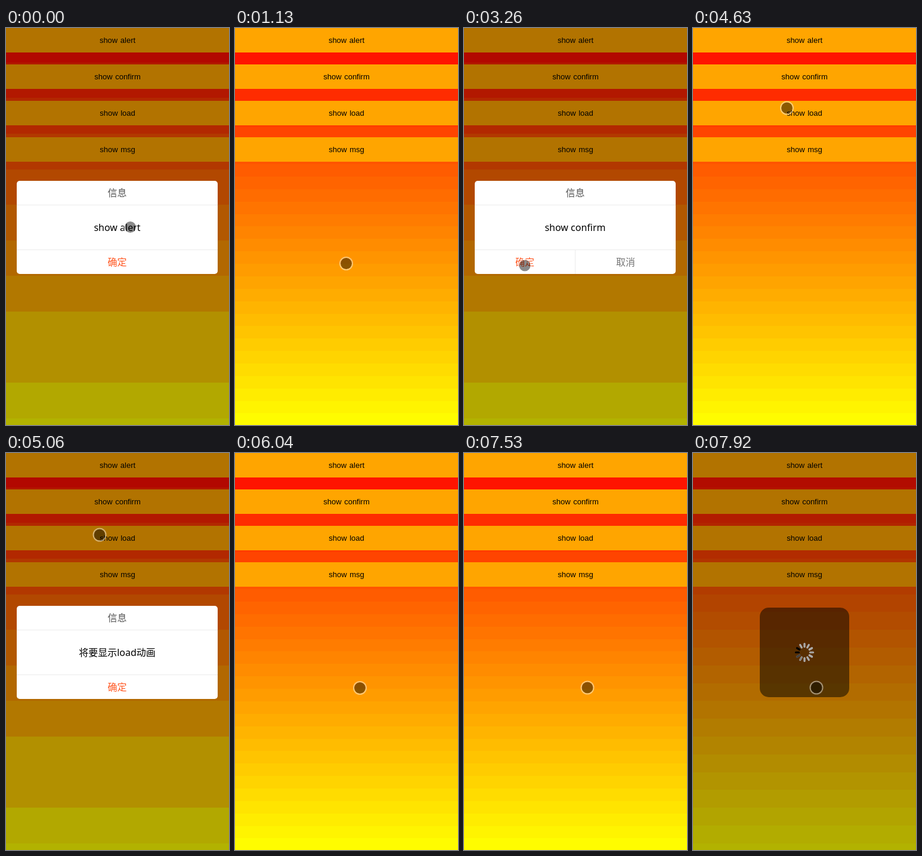
An HTML page with a canvas for the animation above (8 s loop, 374 by 665 pixels).

```html
<!DOCTYPE html>
<html lang="zh-CN">
<head>
<meta charset="utf-8">
<title>Dialogs</title>
<style>
html, body { margin: 0; width: 100%; height: 100%; overflow: hidden; }
#stage { position: relative; width: 374px; height: 665px; overflow: hidden; }
#stage > * { position: absolute; }
#sky { left: 0; top: 0; }
#menu { inset: 0; }
#menu div {
  height: 41px; margin-bottom: 20px; background: #ffa500; color: #000; text-align: center;
  font: 13px/41px Arial, "Liberation Sans", sans-serif; word-spacing: 1px;
}
#shade { inset: 0; background: #000; }
#dialog {
  left: 18px; top: 256px; width: 337px; height: 156px; border-radius: 5px;
  background: #fff; overflow: hidden; text-align: center;
  font: 16px/40px "Noto Sans", "Noto Sans CJK SC", "Noto Sans CJK", sans-serif;
}
#title { height: 40px; color: #555; border-bottom: 1px solid #ebebeb; }
#msg { height: 74px; line-height: 74px; color: #000; white-space: pre; }
#foot { display: flex; height: 40px; border-top: 1px solid #ebebeb; }
#foot span { flex: 1; }
#yes { color: #ff5722; }
#no { color: #777; border-left: 1px solid #ebebeb; }
#loader {
  left: 112px; top: 259px; width: 150px; height: 150px; border-radius: 15px;
  background: rgba(0, 0, 0, .5);
}
#cursor {
  left: -11.5px; top: -11.5px; width: 19px; height: 19px; border-radius: 50%;
  border: 2px solid rgba(255, 255, 255, .45);
  background: rgba(0, 0, 0, .46); background-clip: padding-box;
}
</style>
</head>
<body>
<div id="stage">
  <canvas id="sky" width="374" height="665"></canvas>
  <div id="menu">
    <div>show alert</div>
    <div>show confirm</div>
    <div>show load</div>
    <div>show msg</div>
  </div>
  <div id="shade"></div>
  <div id="dialog">
    <div id="title">信息</div>
    <div id="msg"></div>
    <div id="foot"><span id="yes">确定</span><span id="no">取消</span></div>
  </div>
  <div id="loader"><svg width="150" height="150" viewBox="-75 -75 150 150"></svg></div>
  <div id="cursor"></div>
</div>
<script>
const LOOP = 8000, OPEN = 300, DIM = 0.3, H = 665;
const $ = id => document.getElementById(id);
const clamp = (v, lo, hi) => Math.min(hi, Math.max(lo, v));

const LAYERS = [
  { from: -OPEN, to: 1130, msg: 'show alert' },
  { from: 2103, to: 3810, msg: 'show confirm', no: true },
  { from: 4760, to: 6040, msg: '将要显示load动画' },
  { from: 6155, to: 7530, msg: 'load 动画将在3秒后关闭！' },
  { from: 7620, to: LOOP }
];

// The pointer rests at each stop until the next move begins
const HOME = { x: 208, y: 333 };
const MOVES = [
  { from: 0, to: 390, x: 186, y: 394 },
  { from: 1270, to: 1980, x: 168, y: 81.5 },
  { from: 2540, to: 3260, x: 101.5, y: 397.5 },
  { from: 3810, to: 4630, x: 157, y: 133.5 },
  { from: 4770, to: 4910, x: 156.5, y: 136.5 },
  { from: 5060, to: 5920, x: 209, y: 393 },
  { from: 6710, to: 6850, x: 206.5, y: 392.5 }
];

function pointer(t) {
  let { x, y } = HOME;
  for (const m of MOVES) {
    const u = clamp((t - m.from) / (m.to - m.from), 0, 1);
    const k = u * u * (3 - 2 * u);
    x += (m.x - x) * k;
    y += (m.y - y) * k;
  }
  return [x, y];
}

// CSS "ease" curve, solved by bisection
const bezier = (a, b, s) => 3 * a * s * (1 - s) ** 2 + 3 * b * s * s * (1 - s) + s ** 3;
function ease(x) {
  if (x >= 1) return 1;
  let lo = 0, hi = 1;
  for (let i = 0; i < 20; i++) {
    const mid = (lo + hi) / 2;
    if (bezier(.25, .25, mid) < x) lo = mid; else hi = mid;
  }
  return bezier(.1, 1, lo);
}

// Red to yellow in flat bands; dimming makes them taller, a dialog makes them coarser
const ctx = $('sky').getContext('2d');
let painted = '';
function drawSky(light, coarse) {
  const key = light + '/' + coarse;
  if (key === painted) return;
  painted = key;
  const step = coarse ? 16 : 8;
  for (let y = 0; y < H; y++) {
    const band = Math.floor(((y + .5) / H * 255 * light + .5) / step);
    const level = coarse && band >> 1 === 4 ? 9 : band + .5;
    ctx.fillStyle = `rgb(255,${Math.min(255, Math.round(level * step / light))},0)`;
    ctx.fillRect(0, y, 374, 1);
  }
}

const svg = document.querySelector('svg');
function addSpoke(angle, width) {
  const line = document.createElementNS('http://www.w3.org/2000/svg', 'line');
  const attrs = { y1: -9.5, y2: -14.5, 'stroke-width': width,
    'stroke-linecap': 'round', transform: `rotate(${angle})` };
  for (const name in attrs) line.setAttribute(name, attrs[name]);
  svg.append(line);
  return line;
}
const spokes = Array.from({ length: 12 }, (_, i) =>
  ({ rim: addSpoke(i * 30, 3.2), core: addSpoke(i * 30, 1.8) }));

// The darkest spoke runs clockwise, the ones behind it fade to grey
function spin(t) {
  const head = Math.floor(t / 80) + 7;
  const gray = v => `rgb(${v},${v},${v})`;
  spokes.forEach(({ rim, core }, i) => {
    const age = (head - i + 144) % 12;
    core.setAttribute('stroke', gray(clamp((age - 1) * 60, 0, 165)));
    rim.setAttribute('stroke', gray(clamp((age - 1) * 90, 0, 187)));
  });
}

function render(t) {
  const layer = LAYERS.find(l => t >= l.from && t < l.to);
  const p = layer ? ease((t - layer.from) / OPEN) : 0;
  const isDialog = Boolean(layer && layer.msg);
  drawSky(1 - DIM * p, isDialog && p > .5);
  $('shade').style.opacity = DIM * p;

  const look = { opacity: p, transform: p < 1 ? `scale(${1.1 - .1 * p})` : 'none' };
  $('dialog').style.display = isDialog ? 'block' : 'none';
  $('loader').style.display = layer && !isDialog ? 'block' : 'none';
  if (isDialog) {
    $('msg').textContent = layer.msg;
    $('no').style.display = layer.no ? 'block' : 'none';
    Object.assign($('dialog').style, look);
  } else if (layer) {
    Object.assign($('loader').style, look);
    spin(t);
  }
  const [x, y] = pointer(t);
  $('cursor').style.transform = `translate(${x}px, ${y}px)`;
}

const start = performance.now();
function frame() {
  render((performance.now() - start) % LOOP);
  requestAnimationFrame(frame);
}
frame();
</script>
</body>
</html>
```
